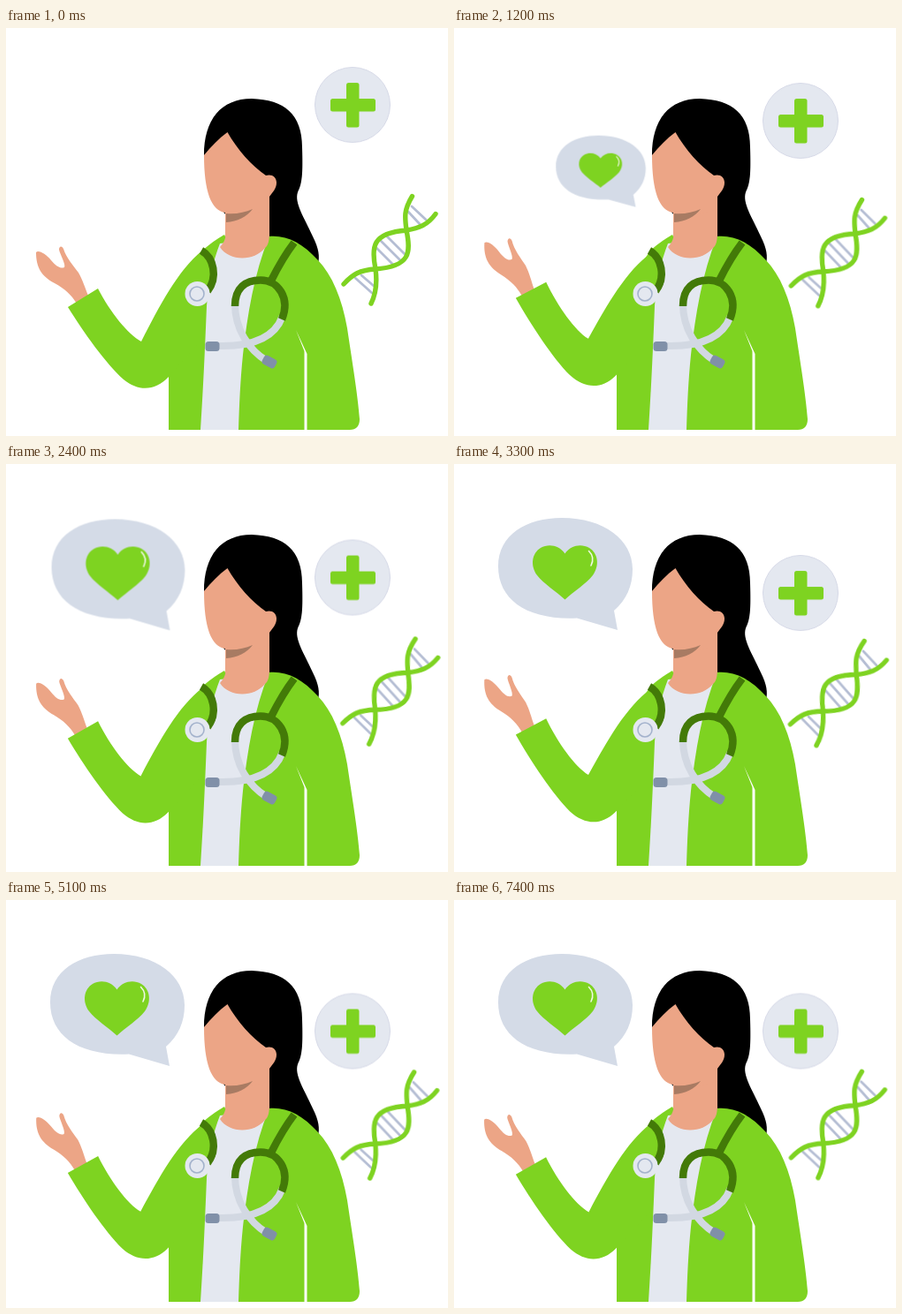
An HTML page without scripts for the animation above (7500 ms loop, 500x462 px).

```html
<!DOCTYPE html>
<html lang="en">
<head>
<meta charset="utf-8">
<title>Doctor</title>
<style>
@property --lift { syntax: "<number>"; inherits: true; initial-value: 0; }

html, body { margin: 0; width: 100%; height: 100%; overflow: hidden; background: #fff; }
svg { display: block; width: 500px; height: 462px; }

.green { fill: #7ed321; }
.skin { fill: #eca586; }
.pale { fill: #e4e8f0; }
.tip { fill: #8090a8; }
.line { fill: none; stroke-linecap: round; stroke-linejoin: round; }
.dark { stroke: #437a08; stroke-width: 8.5; stroke-linecap: butt; }
.tube { stroke: #d2d8e2; stroke-width: 8; stroke-linecap: butt; }
.strand { stroke: #7ed321; stroke-width: 5.4; }
.rung { stroke: #b4bdd3; stroke-width: 2.8; }

.arm, .dna, .plus, .bubble { animation: 7.5s linear infinite; }
.arm { animation-name: wave; animation-timing-function: ease-in-out; }
.dna { animation-name: tilt; transform-origin: 307px 268px; }
.plus { animation-name: drop; }
.bubble { animation-name: grow; transform-origin: 247px 229px; }

/* the sleeve bends at the elbow, the hand follows with a plain turn */
.hand { transform-origin: 225px 256px; transform: rotate(calc(var(--lift) * 3.2deg)); }
.sleeve {
  transform-origin: 190px 300px;
  transform: rotate(calc(var(--lift) * 1.2deg)) skewY(calc(var(--lift) * 3.7deg));
}

@keyframes wave {
  0% { --lift: 0; }
  16% { --lift: 1; }
  32% { --lift: .5; }
  48.67% { --lift: 1; }
  82%, 100% { --lift: .5; }
}
@keyframes tilt {
  0% { transform: rotate(0); }
  16% { transform: rotate(1.5deg); }
  32% { transform: rotate(2.8deg); animation-timing-function: ease-out; }
  42.67% { transform: rotate(3.7deg); animation-timing-function: ease-in; }
  53.33% { transform: rotate(2.8deg); }
  68% { transform: rotate(1.65deg); animation-timing-function: ease-out; }
  85.33%, 100% { transform: rotate(1.4deg); }
}
@keyframes drop {
  0% { transform: translateY(0); }
  5.33% { transform: translateY(4.2px); }
  10.67% { transform: translateY(10px); }
  16% { transform: translateY(18px); }
  32% { transform: translateY(41.5px); }
  44% { transform: translateY(59px); animation-timing-function: ease-out; }
  49%, 100% { transform: translateY(61.5px); }
}
@keyframes grow {
  0%, 6.67% { transform: scale(0); animation-timing-function: cubic-bezier(.3, .42, .65, .78); }
  16% { transform: scale(.668, .638); animation-timing-function: cubic-bezier(.215, .61, .355, 1); }
  37.33%, 100% { transform: scale(1); }
}
</style>
</head>
<body>
<svg viewBox="0 0 500 462">
  <!-- hair and face -->
  <path d="M224 144C224 104 243 80 278 80C315 81 335 98 335 135C336 166 335 176 330 186C326 198 337 214 347 236C354 250 355 258 353 268H290L240 200Z"/>
  <path class="skin" d="M250.500 118C262 138 278 156 294 167C300 165 306 168 306 175C306 182 302 185 298 191V262H248V209C232 207 224 185 224 144C232 134 241 125 250.500 118Z"/>

  <!-- coat -->
  <path class="green" d="M247 234C238 239 230 245 222 252L190 301L184 325V455H389C396 455 400 451 400 443C398 415 391 374 386 340C380 306 369 280 353 263C335 243 317 234 297 236L262 262Z"/>
  <g class="arm">
    <path class="skin hand" d="M34 254C37 251 45 256 51 263C57 270 62 273 66 271C68 268 61 256 60 251C60 247 63 246 65 250C68 260 76 269 82 277C87 286 89 293 93 303L80 312C74 302 66 295 55 289C40 281 34 271 34 254Z"/>
    <path class="green sleeve" d="M222 252C194 275 174 314 153 355C138 347 118 322 104 295L70 316C88 345 113 380 133 398C150 412 169 411 184 395L224 350L236 270Z"/>
  </g>
  <path fill="#fff" d="M328 342L337.500 366V456H340.500V369Z"/>
  <path class="pale" d="M242 244C234 265 229 285 227 315C225 365 223 410 220 455H263C264 425 265 400 268 370C273 325 281 277 297 238Z"/>
  <path class="skin" d="M249 218V230C249 237 247 243 242 248C252 264 280 265 293 249C297 246 298 240 298 230V205Z"/>
  <path fill="#a87b63" d="M249 210C260 211 270 209 279 205C272 214 262 219 249 220Z"/>

  <!-- stethoscope -->
  <path class="line dark" d="M221 252C235 260 240 282 228 298"/>
  <circle class="pale" cx="216.500" cy="301" r="14"/>
  <circle cx="216" cy="301" r="8" fill="none" stroke="#a3b2cc" stroke-width="1.600"/>
  <path class="line tube" d="M259 313C259 340 274 364 295 377M312.500 327C304 350 280 361 240 360"/>
  <path class="line dark" d="M326 243Q313 260 300 286M259 315C259 294 271 285.500 288 285.500C308 285.500 322 306 312 330"/>
  <rect class="tip" x="225.500" y="355" width="16" height="11" rx="3.500"/>
  <rect class="tip" x="290" y="372.500" width="16" height="11" rx="3.500" transform="rotate(28 298 378)"/>

  <g class="dna">
    <path class="line rung" d="M459 202L475 217M455 208L468 222M431 236L453 258M424 241L448 265M419 249L439 269M402 280L416 292M395 283L414 300"/>
    <path class="line strand" d="M459.500 190.500C450 206 451 214 453 229C458 254 458 270 418 273C400 274 392 279 382 290M486 210.500C477 223 467 227 453 229C414 232 413 248 418 273C420 288 419 300 413 312"/>
  </g>

  <g class="plus">
    <circle cx="392" cy="87" r="42.500" fill="#e4e8f0" stroke="#d6d9e7"/>
    <rect class="green" x="367" y="80" width="51" height="14.500" rx="2.500"/>
    <rect class="green" x="385" y="62" width="14.500" height="50.500" rx="2.500"/>
  </g>

  <g class="bubble">
    <path fill="#d4dbe7" d="M122 61C170 61 202 86 202 119C202 138 195 154 181 166L185 188L139 174.500C83 177 50 154 50 116C50 80 82 61 122 61Z"/>
    <path class="green" d="M125.500 101.500C119 92 107 90 98 95C88 101 86 115 94 126C102 136 115 144 125.500 153.500C136 144 149 136 157 126C165 115 163 101 153 95C144 90 132 92 125.500 101.500Z"/>
    <path class="line" stroke="#eef8e2" stroke-width="1.600" d="M152.500 98.500C157 103 158 109 155 115"/>
  </g>
</svg>
</body>
</html>
```
